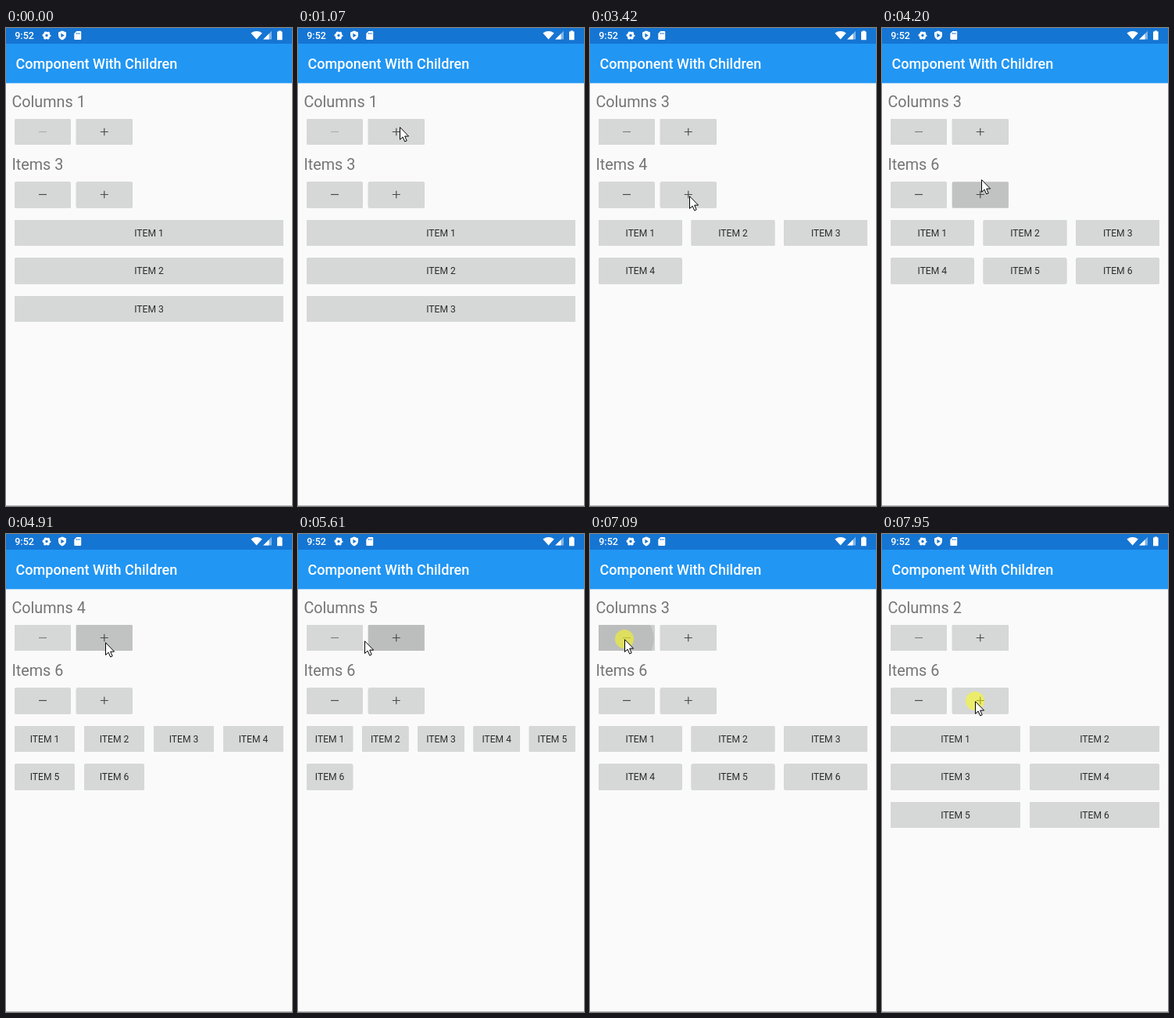
These frames come from a looping animation (366 by 610 pixels, 8000 ms). An HTML page:

```html
<!DOCTYPE html>
<html lang="en">
<head>
<meta charset="utf-8">
<title>Component With Children</title>
<style>
  html, body { margin: 0; width: 100%; height: 100%; overflow: hidden; background: #fafafa; }
  #stage { display: block; width: 100vw; height: 100vh; }
  text { font-family: Roboto, Arial, sans-serif; }
  .label { font-size: 19.8px; fill: #757575; }
  .caption { font-size: 12.1px; fill: #2a2b2a; text-anchor: middle; }
  .face { fill: #d6d8d7; filter: drop-shadow(0 .7px .7px rgba(0, 0, 0, .27)); }
  .glyph { stroke: #484a48; stroke-width: 1.15; fill: none; }
  .soft .glyph { stroke: #7c7e7c; }
  .off .face { filter: none; }
  .off .glyph { stroke: #acaeac; }
</style>
</head>
<body>
<svg id="stage" viewBox="0 0 366 610" xmlns="http://www.w3.org/2000/svg">
  <rect width="366" height="610" fill="#fafafa"/>
  <rect y="609" width="366" height="1" fill="#b9b9b9"/>
  <rect y="20" width="366" height="50.4" fill="#2196f3"/>
  <rect width="366" height="20" fill="#1575d3"/>

  <g fill="#fff">
    <text x="11.2" y="14" font-size="12.6" font-weight="500">9:52</text>
    <text x="12.5" y="52" font-size="18.07" font-weight="500">Component With Children</text>
    <!-- gear -->
    <circle cx="52" cy="9.5" r="3.1" fill="none" stroke="#fff" stroke-width="2.8"/>
    <circle cx="52" cy="9.5" r="4.7" fill="none" stroke="#fff" stroke-width="1.4" stroke-dasharray="2.8 2.12" stroke-dashoffset="1.4"/>
    <!-- shield -->
    <path d="M72 3.5L77 5.4V9Q77 13.4 72 15.6Q67 13.4 67 9V5.4Z"/>
    <path d="M70.4 6.7L74.8 9.4L70.4 12.1Z" fill="#1575d3"/>
    <!-- memory card -->
    <path d="M90.3 4H95.2Q96.2 4 96.2 5V14Q96.2 15 95.2 15H88.3Q87.3 15 87.3 14V7Z"/>
    <path d="M90.3 6V8M92.2 6V8M94.1 6V8" stroke="#1575d3" stroke-width=".9"/>
    <!-- signal and battery -->
    <path d="M313.4 6.4Q320.6 1.6 327.8 6.4L320.6 14.5Z"/>
    <path d="M340 3.8V14.6H329.2Z" opacity=".45"/>
    <path d="M336.6 7.2V14.6H329.2Z"/>
    <path d="M348.8 3.4H352V4.6H353.6V15.2H347V4.6H348.8Z"/>
  </g>

  <text class="label" id="colLabel" x="7.4" y="100.6"></text>
  <text class="label" id="itemLabel" x="7.4" y="181"></text>
  <g id="buttons"></g>
  <g id="items"></g>

  <g id="pointer">
    <circle id="tap" r="12" fill="#ff0" fill-opacity=".5"/>
    <path d="M.5 .7V16.4L4.1 13.1L6.7 18.9L9.2 17.8L6.7 12.1H11.6Z" fill="#fff" stroke="#000" stroke-linejoin="round"/>
  </g>
</svg>
<script>
const LOOP = 8000, TICK = 78.15, LEAD = 128;   // the screen refreshes once per tick
const DOWN = 80, LAG = 170;                    // press length, delay until the layout reacts
const NS = 'http://www.w3.org/2000/svg';
const $ = id => document.getElementById(id);

function set(el, attrs) {
  for (const key in attrs) el.setAttribute(key, attrs[key]);
}
function add(parent, tag, attrs = {}) {
  const el = document.createElementNS(NS, tag);
  set(el, attrs);
  return parent.appendChild(el);
}

const [colMinus, colPlus, itemMinus, itemPlus] = [0, 1, 2, 3].map(makeButton);

function makeButton(i) {
  const plus = i % 2, row = i >> 1;
  const x = 11 + 78.8 * plus, y = 116 + 80.5 * row, width = 72, height = 33;
  const g = add($('buttons'), 'g');
  add(g, 'rect', { class: 'face', x, y, width, height, rx: 1.6 });
  const box = add(g, 'svg', { x, y, width, height });
  add(box, 'rect', { width, height, rx: 1.6, opacity: .04 });
  const wave = add(box, 'circle', { opacity: .085 });
  const bar = `M${x + 31} ${132.5 + 80 * row}h10`;
  add(g, 'path', { class: 'glyph', d: plus ? bar + 'm-5 -4.8v9.6' : bar });
  return { g, x, y, box, wave, row, step: plus ? 1 : -1 };
}

const items = Array.from({ length: 6 }, (_, i) => {
  const g = add($('items'), 'g');
  const face = add(g, 'rect', { class: 'face', height: 33, rx: 1.6 });
  const text = add(g, 'text', { class: 'caption' });
  text.textContent = 'ITEM ' + (i + 1);
  return { g, face, text };
});

// Everything on screen follows from these presses; hold is how long the ripple stays
const presses = [
  [1450, colPlus], [2152, colPlus],
  [2855, itemPlus], [3325, itemPlus], [3793, itemPlus],
  [4496, colPlus], [5122, colPlus, 480],
  [6060, colMinus], [6870, colMinus], [7078, colMinus],
  [7780, itemPlus], [7937, itemPlus]
].map(([at, button, hold = 390]) => ({ at, button, hold }));

const home = [285, 580];
const glides = [
  { from: LEAD, to: 1016, end: [130, 126] },
  { from: 2330, to: 2630, end: [127, 214] },
  { from: 4140, to: 4290, end: [127, 138] },
  { from: 5430, to: 5766, end: [44, 134] },
  { from: 7330, to: 7700, end: [119, 213] }
];

const clamp = k => Math.min(1, Math.max(0, k));
const ease = k => k * k * (3 - 2 * k);

function pointerAt(t) {
  return glides.reduce((pos, { from, to, end }) => {
    const k = ease(clamp((t - from) / (to - from)));
    return pos.map((v, i) => v + (end[i] - v) * k);
  }, home);
}

function countAt(t, row, start) {
  return presses.filter(p => p.button.row === row && t >= p.at + LAG)
    .reduce((sum, p) => sum + p.button.step, start);
}

function layout(columns, count) {
  const pitch = 356 / columns, width = pitch - 12;
  items.forEach(({ g, face, text }, i) => {
    const x = 11 + (i % columns) * pitch;
    const y = 245 + Math.floor(i / columns) * 48.5;
    set(g, { visibility: i < count ? 'visible' : 'hidden' });
    set(face, { x, y, width });
    set(text, { x: x + width / 2, y: y + 20.9 });
  });
}

function drawRipple(b, t) {
  const p = presses.filter(p => p.button === b && t >= p.at + LAG).pop();
  const age = p ? t - p.at : Infinity;
  const opacity = p ? clamp(1 - (age - p.hold) / 50) : 0;
  set(b.box, { opacity });
  if (!opacity) return;
  const [x, y] = pointerAt(p.at);
  set(b.wave, { cx: x - b.x, cy: y - b.y, r: Math.min(80, .87 * (age - LAG)) });
}

function draw(time) {
  const t = LEAD + Math.floor((time - LEAD) / TICK) * TICK;
  const columns = countAt(t, 0, 1), count = countAt(t, 1, 3);
  $('colLabel').textContent = 'Columns ' + columns;
  $('itemLabel').textContent = 'Items ' + count;
  set(colMinus.g, { class: columns === 1 ? 'off' : 'soft' });
  layout(columns, count);
  [colMinus, colPlus, itemMinus, itemPlus].forEach(b => drawRipple(b, t));

  const pressed = presses.some(p => t >= p.at && t < p.at + DOWN);
  set($('pointer'), {
    display: t < LEAD ? 'none' : 'inline',
    transform: `translate(${pointerAt(t).map(Math.round)})`
  });
  set($('tap'), { display: pressed ? 'inline' : 'none' });
}

const begin = performance.now();
function frame() {
  draw((performance.now() - begin) % LOOP);
  requestAnimationFrame(frame);
}
frame();
</script>
</body>
</html>
```
